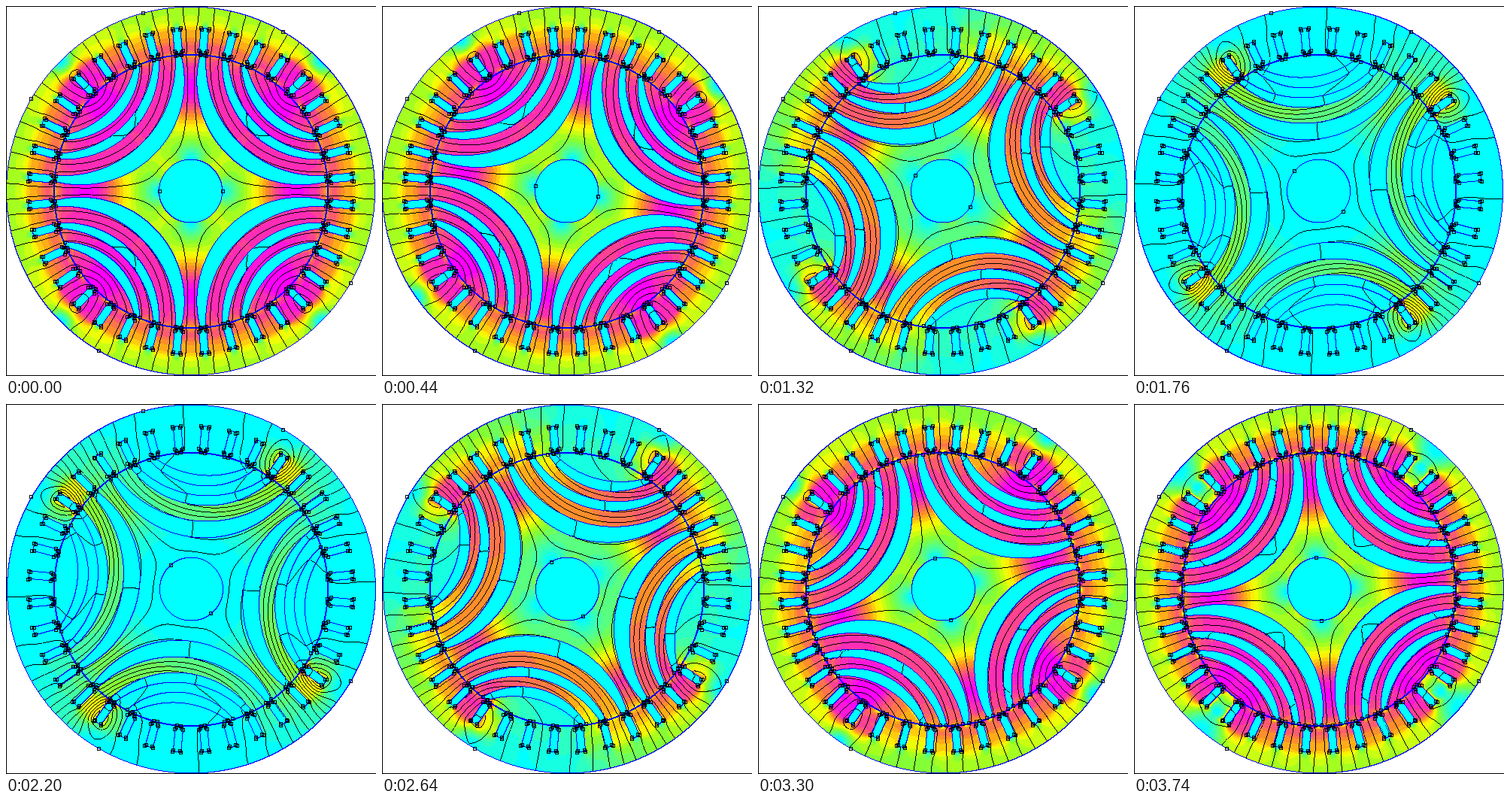
Animation, 492 px wide and 492 px high, one loop 3.96 s. Source, as an HTML page with a canvas:

```html
<!DOCTYPE html>
<html lang="en">
<head>
<meta charset="utf-8">
<title>Reluctance motor flux</title>
<style>
html, body { margin: 0; width: 100%; height: 100%; overflow: hidden; background: #fff; }
canvas { display: block; width: 492px; height: 492px; }
</style>
</head>
<body>
<canvas id="stage" width="492" height="492"></canvas>
<script>
const SIZE = 492, CX = 245.5, CY = 246, D = Math.PI / 180;
const STEPS = 18, STEP_MS = 220, STEP_DEG = 5;
const SHAFT = 42, ROTOR = 181, BORE = 183, OUTER = 245;
const OUT = 0, HUB = 1, GAP = 2, SLOT = 3, STATOR = 4, POLE = 10;

// Barrier edges: radius on the pole axis, half angle at the rotor surface
const EDGES = [[69, 41], [91, 38.5], [112, 31.5], [125, 29], [138, 23], [152, 20.5]]
  .map(([mid, end]) => {
    const c = (ROTOR * ROTOR - mid * mid) / (2 * (ROTOR * Math.cos(end * D) - mid));
    return { end, c, r2: (c - mid) ** 2 };
  });

// Polar grid over one pole; the potential changes sign from pole to pole
const NR = 102, NT = 90, DR = 2, R0 = 41, N = (NR + 1) * NT;

const isIron = c => c === STATOR || (c >= POLE && c % 2 === 0);

function region(r, phi, turn) {
  if (r > OUTER) return OUT;
  if (r < SHAFT) return HUB;
  if (r < ROTOR) {
    const d = (((phi - turn) % 90 + 90) % 90 - 45) * D;
    const x = r * Math.cos(d), y = r * Math.sin(d);
    let k = 0;
    while (k < EDGES.length && (x - EDGES[k].c) ** 2 + y * y < EDGES[k].r2) k++;
    return POLE + k;
  }
  if (r < BORE) return GAP;
  const off = Math.abs((phi + 360) % 10 - 5) * D * r;
  const half = r < 186 ? 2 : r < 217 ? 5.2 : 0;
  return off < half ? SLOT : STATOR;
}

const reluct = b => Math.min(1, 0.002 + 0.06 * Math.pow(Math.min(b, 1.6), 8));

// One current-carrying slot per pole, handed on to its neighbour as the rotor turns
function slotLoad(turn) {
  const load = new Float64Array(N);
  const total = 7 * Math.max(0.02, Math.cos(2 * turn * D)), moved = Math.min(1, turn / 10);
  for (let i = 0; i < NR; i++) for (let j = 40; j < 60; j++) {
    const rm = R0 + DR * (i + 0.5);
    if (rm < 186 || rm > 217) continue;
    let f = 0;
    for (let s = 0; s < 9; s++) if (region(rm, j + (s + 0.5) / 9, 0) === SLOT) f += 1 / 9;
    const share = j < 50 ? 1 - moved : moved;
    const cur = total * share / 322 * f * rm * D * DR / 4;
    const k = i * NT + j;
    for (const n of [k, k + 1, k + NT, k + NT + 1]) load[n] += cur;
  }
  return load;
}

function solve(turn) {
  const cells = NR * NT, load = slotLoad(turn);
  const frac = new Float64Array(cells), ironNu = new Float64Array(cells).fill(0.006);
  const nu = new Float64Array(cells), field = new Float64Array(cells);
  const A = new Float64Array(N), cR = new Float64Array(N), cT = new Float64Array(N);
  const diag = new Float64Array(N).fill(1);
  const res = new Float64Array(N), dir = new Float64Array(N), out = new Float64Array(N);

  for (let i = 0; i < NR; i++) for (let j = 0; j < NT; j++) {
    let f = 0;
    for (let a = 0; a < 3; a++) for (let b = 0; b < 3; b++)
      if (isIron(region(R0 + DR * (i + (a + 0.5) / 3), j + (b + 0.5) / 3, turn))) f += 1 / 9;
    frac[i * NT + j] = f;
  }

  function assemble() {
    for (let c = 0; c < cells; c++) nu[c] = 1 / (frac[c] / ironNu[c] + 1 - frac[c]);
    for (let i = 0; i <= NR; i++) for (let j = 0; j < NT; j++) {
      const k = i * NT + j, left = j ? k - 1 : k + NT - 1;
      cR[k] = i < NR ? (nu[k] + nu[left]) / 2 * (R0 + DR * (i + 0.5)) * D / DR : 0;
      const below = i > 0 ? nu[k - NT] : 0, above = i < NR ? nu[k] : 0;
      cT[k] = (below + above) / 2 * DR / ((R0 + DR * i) * D);
    }
    for (let k = NT; k < N; k++) {
      const left = k % NT ? k - 1 : k + NT - 1;
      diag[k] = cR[k] + cR[k - NT] + cT[k] + cT[left];
    }
  }

  function apply(x, y) {
    for (let i = 1; i <= NR; i++) {
      const s = i * NT, e = s + NT - 1;
      for (let k = s; k <= e; k++) {
        const l = k > s ? cT[k - 1] * x[k - 1] : -cT[e] * x[e];
        const r = k < e ? cT[k] * x[k + 1] : -cT[k] * x[s];
        const up = i < NR ? cR[k] * x[k + NT] : 0;
        y[k] = diag[k] * x[k] - l - r - up - cR[k - NT] * x[k - NT];
      }
    }
  }

  // Conjugate gradients with diagonal scaling
  function relax(count) {
    apply(A, out);
    let rz = 0;
    for (let k = NT; k < N; k++) {
      res[k] = load[k] - out[k];
      dir[k] = res[k] / diag[k];
      rz += res[k] * dir[k];
    }
    for (let n = 0; n < count && rz > 1e-12; n++) {
      apply(dir, out);
      let pq = 0;
      for (let k = NT; k < N; k++) pq += dir[k] * out[k];
      const a = rz / pq;
      let next = 0;
      for (let k = NT; k < N; k++) {
        A[k] += a * dir[k];
        res[k] -= a * out[k];
        next += res[k] * res[k] / diag[k];
      }
      const b = next / rz;
      for (let k = NT; k < N; k++) dir[k] = res[k] / diag[k] + b * dir[k];
      rz = next;
    }
  }

  function measure() {
    for (let i = 0; i < NR; i++) for (let j = 0; j < NT; j++) {
      const k = i * NT + j, last = j === NT - 1;
      const right = last ? k - j : k + 1, sg = last ? -1 : 1;
      const a = A[k], b = sg * A[right], c = A[k + NT], d = sg * A[right + NT];
      const bt = (c + d - a - b) / (2 * DR);
      const br = (b - a + d - c) / (2 * (R0 + DR * (i + 0.5)) * D);
      field[k] = Math.hypot(bt, br) * nu[k] / ironNu[k];
    }
  }

  for (let pass = 0; pass < 24; pass++) {
    assemble();
    relax(pass ? 32 : 300);
    measure();
    if (pass < 23) for (let c = 0; c < cells; c++)
      ironNu[c] = Math.pow(ironNu[c], 0.8) * Math.pow(reluct(field[c]), 0.2);
  }
  return { A, field, frac };
}

const pack = (r, g, b) => (0xff000000 | b << 16 | g << 8 | r) >>> 0;
const WHITE = pack(255, 255, 255), BLACK = pack(0, 0, 0), BLUE = pack(0, 0, 255);
const STOPS = [[0, 255, 255], [70, 255, 160], [140, 255, 40], [255, 255, 0],
  [255, 150, 30], [255, 70, 140], [255, 0, 255]];
const BANDS = Array.from({ length: 20 }, (_, n) => {
  const t = n / 19 * 6, k = Math.min(5, Math.floor(t));
  return pack(...STOPS[k].map((v, c) => Math.round(v + (STOPS[k + 1][c] - v) * (t - k))));
});
const shade = b => BANDS[Math.max(0, Math.min(19, Math.floor((b - 0.06) / 0.94 * 20)))];

function paint(turn, { A, field, frac }) {
  const cv = document.createElement('canvas');
  cv.width = cv.height = SIZE;
  const g = cv.getContext('2d'), img = g.createImageData(SIZE, SIZE);
  const px = new Uint32Array(img.data.buffer);
  const code = new Uint8Array(SIZE * SIZE), flux = new Float32Array(SIZE * SIZE);
  let peak = 0;
  for (let k = 0; k < N; k++) peak = Math.max(peak, Math.abs(A[k]));
  const node = (i, j) => j < NT ? A[i * NT + j] : -A[i * NT + j - NT];

  function ironField(r, v) {
    const u = (r - R0) / DR - 0.5, w = v - 0.5;
    const i0 = Math.floor(u), j0 = Math.floor(w);
    let sum = 0, wt = 0;
    for (let a = 0; a < 2; a++) for (let b = 0; b < 2; b++) {
      const i = Math.max(0, Math.min(NR - 1, i0 + a)), c = i * NT + (j0 + b + NT) % NT;
      const m = (a ? u - i0 : 1 - u + i0) * (b ? w - j0 : 1 - w + j0) * frac[c];
      sum += m * field[c];
      wt += m;
    }
    return wt > 1e-6 ? sum / wt : 0;
  }

  for (let y = 0, p = 0; y < SIZE; y++) for (let x = 0; x < SIZE; x++, p++) {
    const dx = x - CX, dy = y - CY, r = Math.sqrt(dx * dx + dy * dy);
    const phi = (Math.atan2(dx, -dy) / D + 360) % 360;
    const c = code[p] = region(r, phi, turn);
    if (c === OUT) { px[p] = WHITE; continue; }
    const quad = Math.floor(phi / 90), v = phi - quad * 90;
    px[p] = isIron(c) ? shade(ironField(r, v)) : BANDS[0];
    if (r < R0) continue;
    const u = (r - R0) / DR, i = Math.min(NR - 1, Math.floor(u)), j = Math.min(NT - 1, Math.floor(v));
    const fu = u - i, fv = v - j;
    const low = node(i, j) * (1 - fv) + node(i, j + 1) * fv;
    const high = node(i + 1, j) * (1 - fv) + node(i + 1, j + 1) * fv;
    flux[p] = (low * (1 - fu) + high * fu) * (quad % 2 ? -1 : 1) / peak * 10 + 0.5;
  }

  for (let y = 0; y < SIZE - 1; y++) for (let x = 0; x < SIZE - 1; x++) {
    const p = y * SIZE + x, c = code[p], cr = code[p + 1], cd = code[p + SIZE];
    if (c === GAP || (c !== cr && cr !== GAP) || (c !== cd && cd !== GAP)) { px[p] = BLUE; continue; }
    if (c === OUT || c === HUB) continue;
    const f = flux[p];
    const slope = Math.max(Math.abs(flux[p + 1] - f), Math.abs(flux[p + SIZE] - f));
    if (Math.abs(f - Math.round(f)) < slope / 2) px[p] = BLACK;
  }
  g.putImageData(img, 0, 0);
  return cv;
}

const ctx = document.getElementById('stage').getContext('2d');

function knot(r, deg, off = 0) {
  const s = Math.sin(deg * D), c = Math.cos(deg * D);
  const x = Math.round(CX + r * s + off * c), y = Math.round(CY - r * c + off * s);
  ctx.strokeRect(x - 1.5, y - 1.5, 4, 4);
}

const SLOT_KNOTS = [[217, 5.5], [215, 4.5], [187, 5.5], [185, 3.5], [182, 2.5]];

function drawKnots(turn) {
  ctx.strokeStyle = ctx.fillStyle = '#000';
  ctx.lineWidth = 1;
  for (let deg = 5; deg < 360; deg += 10)
    for (const [r, off] of SLOT_KNOTS) { knot(r, deg, off); knot(r, deg, -off); }
  for (let pole = 45; pole < 360; pole += 90)
    for (const { end } of EDGES) { knot(ROTOR, pole + turn + end); knot(ROTOR, pole + turn - end); }
  for (const deg of [-60, -15, 30, 120, 210]) knot(OUTER, deg);
  knot(SHAFT, turn + 90);
  knot(SHAFT, turn - 90);
  ctx.fillRect(0, 0, SIZE, 1);
  ctx.fillRect(0, 0, 1, SIZE);
  ctx.fillRect(0, SIZE - 1, SIZE, 1);
}

// Later steps mirror the earlier ones
const plates = [];
for (let s = 0; s <= STEPS / 2; s++) plates.push(paint(s * STEP_DEG, solve(s * STEP_DEG)));

function show(step) {
  ctx.save();
  if (step > STEPS / 2) { ctx.translate(SIZE, 0); ctx.scale(-1, 1); }
  ctx.drawImage(plates[Math.min(step, STEPS - step)], 0, 0);
  ctx.restore();
  drawKnots(step * STEP_DEG);
}

const start = performance.now();
let shown = 0;
show(0);
function tick() {
  const step = Math.floor((performance.now() - start) / STEP_MS) % STEPS;
  if (step !== shown) show(shown = step);
  requestAnimationFrame(tick);
}
requestAnimationFrame(tick);
</script>
</body>
</html>
```
